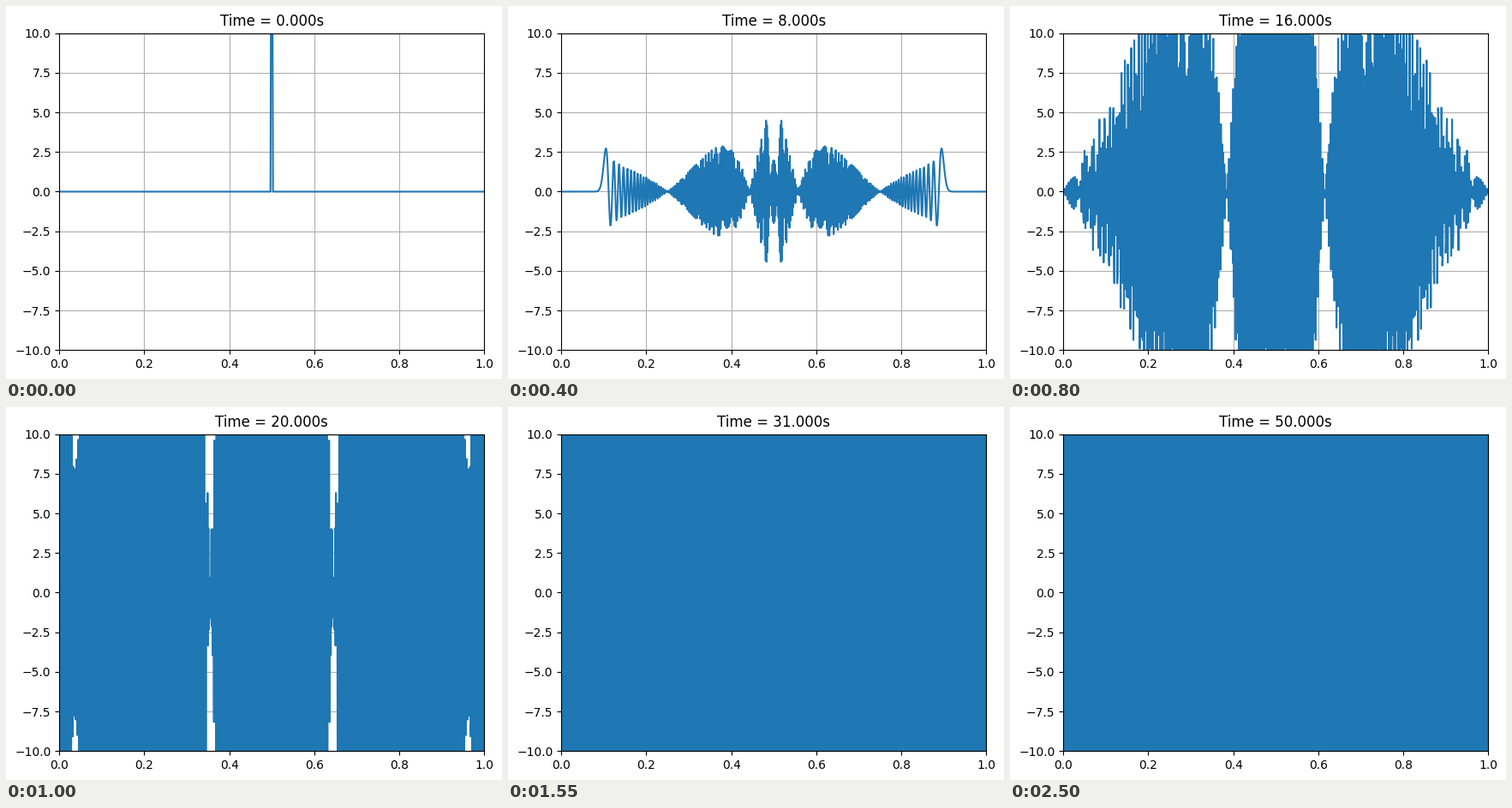
A matplotlib script for the animation above (2.55 s loop, 579 px wide and 435 px high).

```python
import numpy as np
import matplotlib.pyplot as plt
from matplotlib.animation import FuncAnimation

WIDTH, HEIGHT, DPI = 579, 435, 100
FRAMES, INTERVAL = 51, 50

# A box pulse on a fixed string, split into sine modes
CELLS = 1000
SPEED = 0.05
STEP = 1e-4        # explicit time step: short waves slowly blow up
SMOOTHING = 0.467  # extra lag of short waves

x = np.linspace(0, 1, CELLS + 1)
pulse = np.where(np.abs(x - 0.5) < 0.0025, 10.0, 0.0)
modes = np.arange(1, CELLS)
shapes = np.sin(np.pi * np.outer(x, modes))
weights = 2 / CELLS * pulse @ shapes

s = np.sin(np.pi * modes / (2 * CELLS))
omega = 2 * SPEED * CELLS * s * np.exp(-SMOOTHING * s**2 / 2)
log_gain = np.log(1 + 1j * omega * STEP) / STEP


def displacement(t):
    return shapes @ (weights * np.exp(log_gain * t).real)


# The small margin keeps the pixel size from being rounded down
fig = plt.figure(figsize=((WIDTH + 0.01) / DPI, (HEIGHT + 0.01) / DPI),
                 dpi=DPI, facecolor="white")
left, top, width, height = 62.2, 31.7, 496, 369.6
ax = fig.add_axes([left / WIDTH, 1 - (top + height) / HEIGHT,
                   width / WIDTH, height / HEIGHT])
ax.set_xlim(0, 1)
ax.set_ylim(-10, 10)
ax.grid(True)
line, = ax.plot(x, pulse, color="#1f77b4", lw=1.5)
title = ax.set_title("Time = 0.000s")


def update(frame):
    t = float(frame)
    line.set_ydata(displacement(t) if frame else pulse)
    title.set_text(f"Time = {t:.3f}s")
    return line, title


anim = FuncAnimation(fig, update, frames=FRAMES, interval=INTERVAL,
                     repeat=True, repeat_delay=0, blit=False)
plt.show()
```
